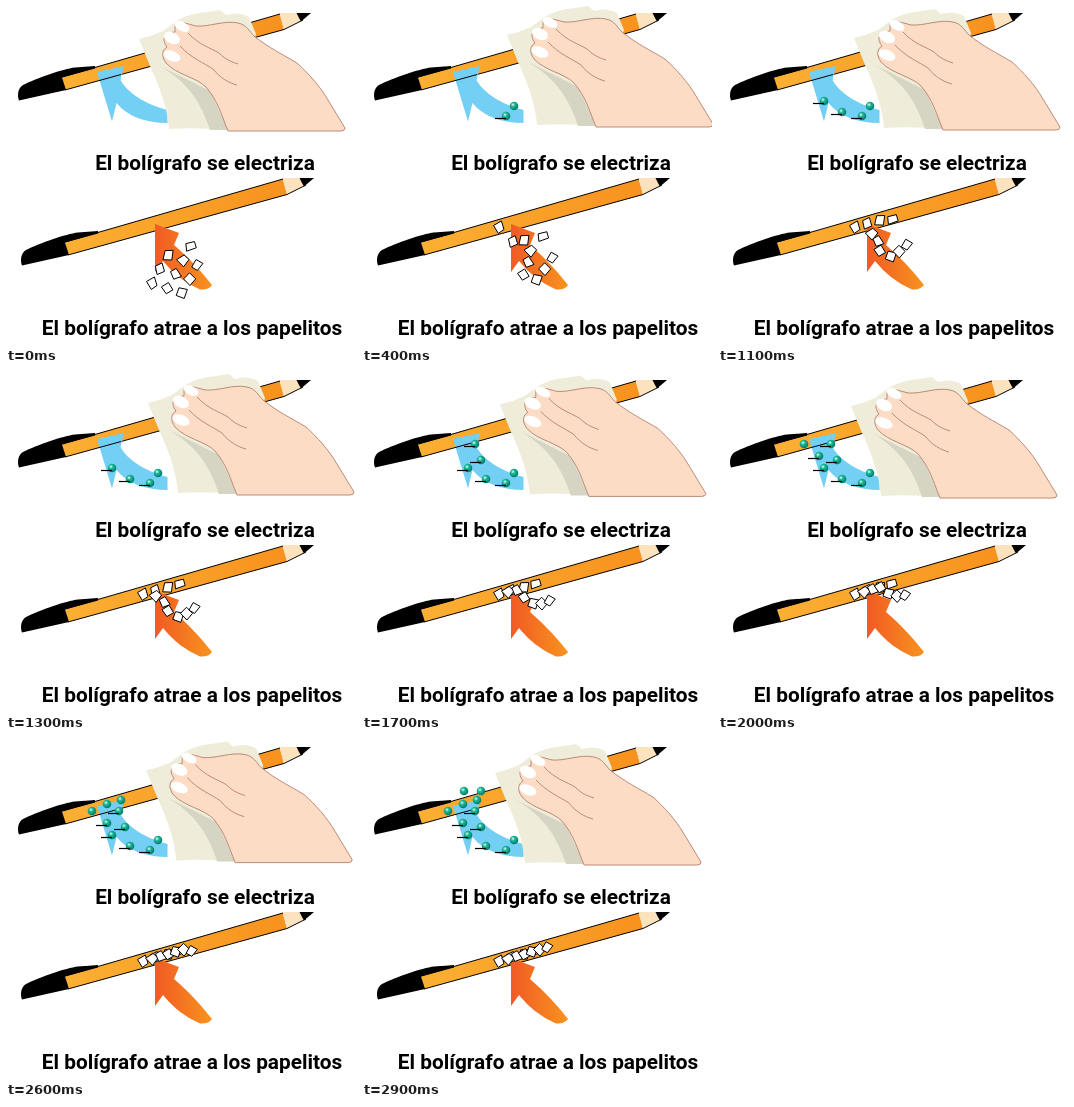
An HTML page for the animation above (3 s loop, 350 by 339 pixels).

```html
<!DOCTYPE html>
<html lang="es">
<head>
<meta charset="utf-8">
<title>El bolígrafo electrizado</title>
<style>
html, body { margin: 0; width: 100%; height: 100%; overflow: hidden; background: #fff; }
svg { display: block; width: 350px; height: 339px; }
text { font: bold 20.8px Roboto, sans-serif; text-anchor: middle; }
</style>
</head>
<body>
<svg viewBox="0 0 350 339">
  <defs>
    <linearGradient id="wood"><stop stop-color="#fbb033"/><stop offset="1" stop-color="#f7921e"/></linearGradient>
    <linearGradient id="glow"><stop stop-color="#f15a24"/><stop offset="1" stop-color="#f7931e"/></linearGradient>
    <radialGradient id="shine" cx=".38" cy=".35" r=".65">
      <stop stop-color="#e4fff6"/><stop offset=".35" stop-color="#1fb79a"/><stop offset="1" stop-color="#007a66"/>
    </radialGradient>
    <clipPath id="crop"><rect y="172" width="350" height="100"/></clipPath>
    <g id="pen" clip-path="url(#crop)">
      <path d="M59 236 277 173 281 188.500 62 249Z" fill="url(#wood)"/>
      <path d="M276 171 281 188.500 300 179 296 171Z" fill="#fde3bd"/>
      <path d="M59 236 277 173M62 249 281 188.500 300 179" fill="none" stroke="#000"/>
      <path d="M293 171 296 177 298 180.500 308 172V171Z"/>
      <path d="M16 259.500C14 254 15 247 20 244 34 237 60 228 72 226.500L92 225V227.500L59 236.500 63 249Z"/>
    </g>
  </defs>

  <use href="#pen" x="-3" y="-165"/>
  <path d="M91 66 118 60 114.500 74C121 86 138 98 161.500 104V117C140 117 122 111 110.500 97L106 115.500Z" fill="#74cff5"/>
  <path d="M93 74.600 115 68.500" stroke="#000"/>
  <g id="charges"></g>
  <g id="hand">
    <path d="M133 33Q146 30 157 25L172 14Q185 7 201 6L214 4 220 9Q233 5 243 11L250 28 222 124Q190 121 163 123 161 96 144 60Z" fill="#efedda"/>
    <path d="M152 59C181 75 195 96 204 124H222L204 85Z" fill="#d6d4c3"/>
    <path d="M169 20C171 14 179 17 190 20 204 21 218 14 232 17 241 19 243 25 248 30 263 42 276 48 291 57 302 67 314 80 322 94L339 122Q339 125 335 125H222C215 108 212 95 200 81 190 71 171 69 160 57 155 50 156 44 161 41 155 33 158 27 169 26Z" fill="#fddcc6" stroke="#b5816c" stroke-width=".9"/>
    <path d="M182 27C193 39 205 42 213 47 220 54 226 56 232 58M174 40C185 52 198 57 207 63 214 72 223 77 231 79" fill="none" stroke="#b5816c" stroke-width=".9"/>
    <g fill="#fff">
      <ellipse rx="8" ry="4.500" transform="translate(176 20.500) rotate(28)"/>
      <ellipse rx="8.500" ry="5.500" transform="translate(166 32) rotate(25)"/>
      <ellipse rx="9" ry="5" transform="translate(166 50) rotate(22)"/>
    </g>
  </g>
  <text x="199" y="164">El bolígrafo se electriza</text>

  <use href="#pen"/>
  <path d="M149 218 173 227 168 239Q188 256 206 279 203 284 194 283.500 172 274 157 255L149 266Z" fill="url(#glow)"/>
  <g id="papers" fill="#fff" stroke="#000"></g>
  <text x="186" y="329">El bolígrafo atrae a los papelitos</text>
</svg>
<script>
const FRAME = 100, FRAMES = 30, STROKE = 10, PAPERS = 10;
const byId = id => document.getElementById(id);
const move = (node, x, y) => node.setAttribute("transform", `translate(${x} ${y})`);

function add(parent, tag, attrs) {
  const node = document.createElementNS("http://www.w3.org/2000/svg", tag);
  for (const key in attrs) node.setAttribute(key, attrs[key]);
  return byId(parent).appendChild(node);
}

let seed = 7;
const random = () => (seed = seed * 16807 % 2147483647) / 2147483647;

// Charges climb the blue arrow, two at a time; those on the arrow carry a minus sign.
const spots = "152,100 144,110 124,106 106,95 119,87 113,71 101,83 86,71 101,64 115,60 102,51 119,51";
const charges = spots.split(" ").map((spot, i) => {
  const [cx, cy] = spot.split(",").map(Number);
  const nodes = [add("charges", "circle", { cx, cy, r: 4.3, fill: "url(#shine)" })];
  if (i > 0 && i < 7)
    nodes.unshift(add("charges", "path", { d: `M${cx - 11} ${cy + 2.5}h11`, stroke: "#000", "stroke-width": 1.2 }));
  return { start: 4 + 5 * Math.floor(i / 2), nodes };
});

function scrap() {
  const turn = random() * Math.PI;
  return Array.from({ length: 4 }, (_, k) => {
    const angle = turn + k * Math.PI / 2 + random() * 0.5, radius = 5 + random() * 2;
    return [radius * Math.cos(angle), radius * Math.sin(angle)];
  }).join(" ");
}

// Scraps lie on a slanted grid and leave it in a zigzag, column by column.
const papers = Array.from({ length: PAPERS }, (_, i) => {
  const col = i < 3 ? 0 : i < 7 ? 1 : 2;
  const row = [2 - i, i - 4, 9 - i][col];
  const endX = i < 4 ? 137 + 12.3 * i : 114 + 8 * i;
  return {
    node: add("papers", "polygon", { points: scrap() }),
    x: 162 + 15 * col - 8 * row, y: 249 + 5 * col + 14 * row,
    endX, endY: 221 - 0.28 * (endX - 137),
    steps: 4 + 24 * i / (PAPERS - 1)
  };
});

function draw() {
  const step = Math.floor(performance.now() / FRAME) % FRAMES;
  const phase = step % STROKE;
  const rub = phase < 4 ? phase / 4 : (9 - phase) / 5;
  move(byId("hand"), 12 * rub, -4 * rub);
  for (const { start, nodes } of charges)
    for (const node of nodes) node.setAttribute("visibility", step >= start ? "visible" : "hidden");
  for (const { node, x, y, endX, endY, steps } of papers) {
    const k = Math.min(1, step / steps);
    move(node, x + (endX - x) * k, y + (endY - y) * k);
  }
  requestAnimationFrame(draw);
}
draw();
</script>
</body>
</html>
```
